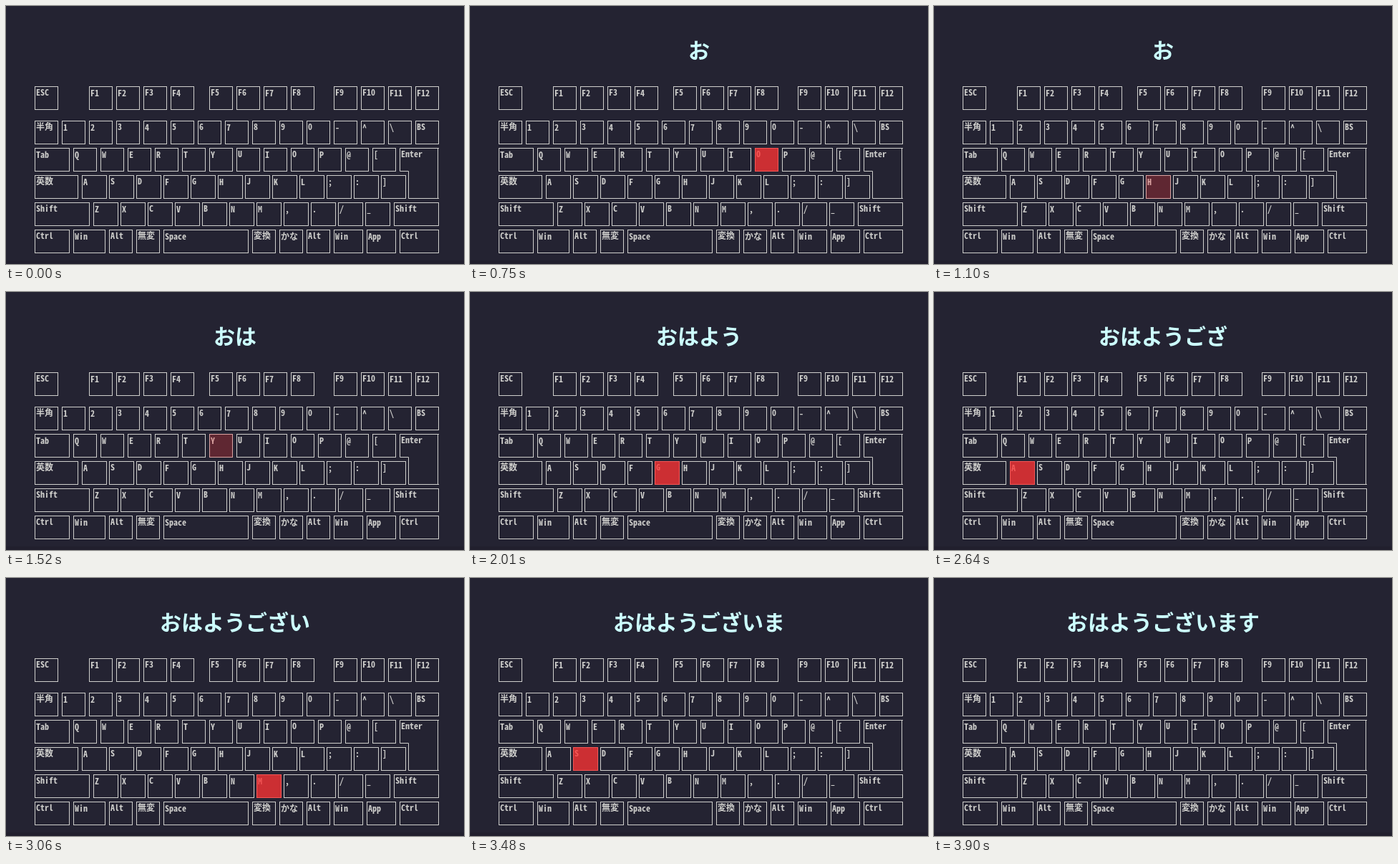
Recreate the animation shown at these times as an HTML page. Size 640 px wide and 360 px high, loop 4.64 s.

```html
<!DOCTYPE html>
<html lang="ja">
<head>
<meta charset="utf-8">
<title>Typing</title>
<style>
html, body { margin: 0; width: 100%; height: 100%; overflow: hidden; background: #242332; }
svg { display: block; width: 640px; height: 360px; }
text { font-family: "Noto Sans Mono CJK JP", "Noto Sans CJK JP", monospace; font-weight: 700; white-space: pre; }
.label { font-size: 12px; fill: #cfcfcc; }
.cap { fill: none; stroke: #cfcfcc; stroke-width: 1; }
#word { font-size: 30px; fill: #ccffff; text-anchor: middle; }
</style>
</head>
<body>
<svg id="stage" viewBox="0 0 640 360">
  <rect width="640" height="360" fill="#242332"/>
  <rect y="355" width="640" height="5" fill="#211f2d"/>
  <g id="board"></g>
  <rect id="glow" fill="#ff3333"/>
  <text id="word" x="320" y="72.5"></text>
</svg>
<script>
const NS = "http://www.w3.org/2000/svg";
const $ = id => document.getElementById(id);
const board = $("board"), glow = $("glow"), word = $("word");
const keys = {};

function add(tag, attrs, content) {
  const el = document.createElementNS(NS, tag);
  for (const name in attrs) el.setAttribute(name, attrs[name]);
  if (content) el.textContent = content;
  board.appendChild(el);
}

// Round-bottomed glyphs and kanji sit one pixel higher.
const raised = /[035689BCDGJOUt]|^S$|[一-龠]/;

function label(name, x, y) {
  const base = y + (raised.test(name) ? 12.5 : 13.5);
  add("text", { class: "label", x: x + 2, y: base }, name);
}

function key(name, x, y, w = 33) {
  add("rect", { class: "cap", x: x + 0.5, y: y + 0.5, width: w - 1, height: 32 });
  label(name, x, y);
  keys[name] = { x, y, width: w, height: 33 };
}

function run(names, x, y, w) {
  names.split(" ").forEach((name, i) => key(name, x + i * 38, y, w));
}

run("ESC", 40, 112);
run("F1 F2 F3 F4", 116, 112);
run("F5 F6 F7 F8", 284, 112);
run("F9 F10 F11 F12", 458, 112);
run("半角 1 2 3 4 5 6 7 8 9 0 - ^ \\ BS", 40, 160);

key("Tab", 40, 198, 49);
run("Q W E R T Y U I O P @ [", 94, 198);
add("path", { class: "cap", d: "M605 198.5H550.5V230.5H562.5V268.5H605M603.5 198.5V268.5" });
label("Enter", 550, 198);

key("英数", 40, 236, 61);
run("A S D F G H J K L ; : ]", 106, 236, 35);

key("Shift", 40, 274, 77);
run("Z X C V B N M , . / _", 122, 274, 35);
key("Shift", 542, 274, 63);

key("Ctrl", 40, 312, 49);
key("Win", 94, 312, 45);
run("Alt 無変", 144, 312);
key("Space", 220, 312, 119);
run("変換 かな Alt", 344, 312);
key("Win", 458, 312, 41);
key("App", 504, 312, 41);
key("Ctrl", 550, 312, 55);

const LOOP = 4640, START = 750, STEP = 70, STEPS_PER_KEY = 3;
const typed = "OHAYOUGOZAIMASU";
const kana = "おはようございます";

function draw(time) {
  const step = Math.floor((time % LOOP - START) / STEP);
  const index = Math.floor(step / STEPS_PER_KEY);
  const active = step >= 0 && index < typed.length;

  // Every vowel completes one kana.
  const vowels = typed.slice(0, Math.max(0, index + 1)).match(/[AIUEO]/g) || [];
  word.textContent = kana.slice(0, vowels.length);

  if (active) {
    const box = keys[typed[index]];
    for (const name in box) glow.setAttribute(name, box[name]);
  }
  glow.setAttribute("opacity", active ? 0.77 - 0.25 * (step % STEPS_PER_KEY) : 0);
}

const origin = performance.now();
function tick() {
  draw(performance.now() - origin);
  requestAnimationFrame(tick);
}
tick();
</script>
</body>
</html>
```
